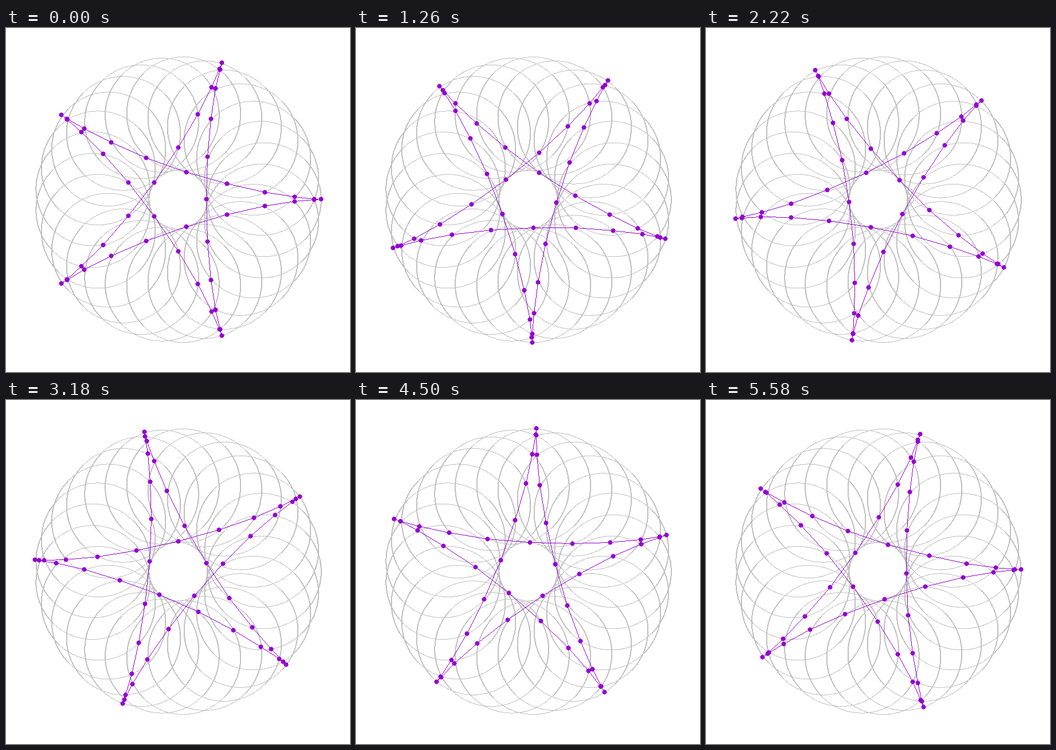
Recreate the animation shown at these times as an HTML page with a canvas. Size 600 by 600 pixels, loop 5.64 s.

```html
<!DOCTYPE html>
<html>
<head>
<meta charset="utf-8">
<style>
html, body { margin: 0; width: 100%; height: 100%; overflow: hidden; background: #fff; }
canvas { position: absolute; left: 0; top: 0; }
</style>
</head>
<body>
<canvas id="rings" width="600" height="600"></canvas>
<canvas id="star" width="600" height="600"></canvas>
<script>
const SIZE = 600, RING = 150, CIRCLES = 25, DOTS = 50;
const STEP = 60, STEPS = 94, TAU = 2 * Math.PI;
const CIRCLE = { x: 300, y: 299.4, r: 99.3 };
const ORBIT = { x: 299.2, y: 298.74, r: 100 };
const rings = document.getElementById('rings').getContext('2d');
const star = document.getElementById('star').getContext('2d');

// Point at angle b on the circle whose centre lies at angle a, snapped to pixels.
function place(o, a, b) {
  return [
    Math.floor(o.x + RING * Math.cos(a) + o.r * Math.cos(b)),
    Math.floor(o.y - RING * Math.sin(a) - o.r * Math.sin(b))
  ];
}

// Unsmoothed one-pixel line.
function line([x0, y0], [x1, y1]) {
  const n = Math.max(Math.abs(x1 - x0), Math.abs(y1 - y0), 1);
  for (let i = 0; i <= n; i++) {
    star.fillRect(Math.round(x0 + (x1 - x0) * i / n), Math.round(y0 + (y1 - y0) * i / n), 1, 1);
  }
}

// Small disc with a one-pixel tip on each side.
function dot([x, y]) {
  [4, 3, 3, 2, 0].forEach((w, dy) => {
    star.fillRect(x - w, y - dy, 2 * w + 1, 1);
    star.fillRect(x - w, y + dy, 2 * w + 1, 1);
  });
}

function drawRings() {
  rings.fillStyle = '#c0c0c0';
  for (let i = 0; i < CIRCLES; i++) {
    for (let j = 0; j < 720; j++) {
      const b = TAU * j / 720;
      const steep = Math.abs(Math.cos(b)) > Math.SQRT1_2;
      const [x, y] = place(CIRCLE, TAU * i / CIRCLES, b);
      rings.fillRect(x, y, steep ? 2 : 1, 1);
    }
  }
}

function draw(now) {
  const phase = Math.PI * (Math.floor(now / STEP) % STEPS) / STEPS;
  const points = Array.from({ length: DOTS }, (_, i) => {
    const t = TAU * i / DOTS;
    return place(ORBIT, 2 * t, -3 * t - phase);
  });
  star.clearRect(0, 0, SIZE, SIZE);
  star.fillStyle = '#9400d3';
  points.forEach((p, i) => {
    line(p, points[(i + 1) % DOTS]);
    dot(p);
  });
}

const start = performance.now();
function tick() {
  draw(performance.now() - start);
  requestAnimationFrame(tick);
}
drawRings();
tick();
</script>
</body>
</html>
```
